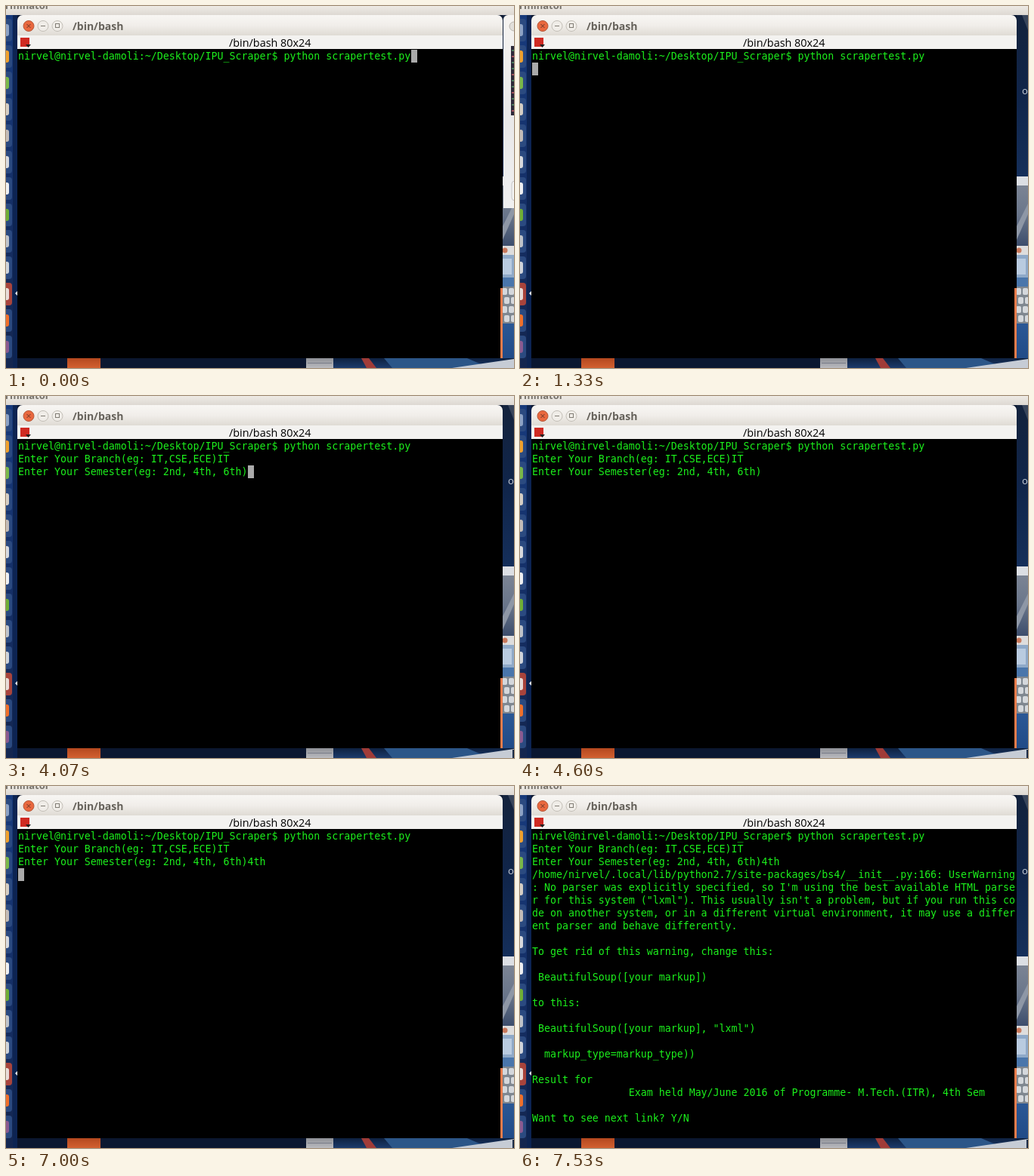
An HTML page with a canvas that plays this animation: 672x480 px, repeating every 8 s.

```html
<!DOCTYPE html>
<html lang="en">
<head>
<meta charset="utf-8">
<title>Terminal session</title>
<style>
  html, body { margin: 0; width: 100%; height: 100%; overflow: hidden; background: #000; }
  canvas { display: block; }
</style>
</head>
<body>
<canvas id="stage" width="672" height="480"></canvas>
<script>
const ctx = document.getElementById('stage').getContext('2d');
const LOOP = 8000, CELL_W = 8, CELL_H = 17, LEFT = 16, TOP = 58;
const UI_FONT = '"Open Sans", "Noto Sans", sans-serif';

// Text written to the terminal: [time in ms, characters]
const output = [
  [0, 'nirvel@nirvel-damoli:~/Desktop/IPU_Scraper$ python scrapertest.py'],
  [1330, '\n'],
  [1800, 'Enter Your Branch(eg: IT,CSE,ECE)'],
  [3200, 'I'], [3330, 'T'],
  [4070, '\nEnter Your Semester(eg: 2nd, 4th, 6th)'],
  [5600, '4'], [6270, 't'], [6400, 'h'],
  [7000, '\n'],
  [7200, '/home/nirvel/.local/lib/python2.7/site-packages/bs4/__init__.py:166: UserWarning' +
    ": No parser was explicitly specified, so I'm using the best available HTML parse" +
    'r for this system ("lxml"). This usually isn\'t a problem, but if you run this co' +
    'de on another system, or in a different virtual environment, it may use a differ' +
    'ent parser and behave differently.\n\n' +
    'To get rid of this warning, change this:\n\n BeautifulSoup([your markup])\n\n' +
    'to this:\n\n BeautifulSoup([your markup], "lxml")\n\n  markup_type=markup_type))\n'],
  [7330, '\nResult for\n' + ' '.repeat(16) +
    'Exam held May/June 2016 of Programme- M.Tech.(ITR), 4th Sem\n\nWant to see next link? Y/N'],
];
const cursorHidden = [[670, 1270], [1870, 2470], [3930, 4070], [4600, 5200], [7530, LOOP]];

function rect(color, x, y, w, h) {
  ctx.fillStyle = color;
  ctx.fillRect(x, y, w, h);
}

function shape(color, path, stroke) {
  ctx.beginPath();
  path();
  ctx.fillStyle = color;
  ctx.fill();
  if (stroke) {
    ctx.strokeStyle = stroke;
    ctx.stroke();
  }
}

const round = (color, x, y, w, h, r, stroke) =>
  shape(color, () => ctx.roundRect(x, y, w, h, r), stroke);
const circle = (color, x, y, r, stroke) =>
  shape(color, () => ctx.arc(x, y, r, 0, 7), stroke);
const polygon = (color, ...points) =>
  shape(color, () => points.forEach(([x, y]) => ctx.lineTo(x, y)));

function label(text, x, y, font, color) {
  ctx.font = font;
  ctx.fillStyle = color;
  ctx.fillText(text, x, y);
}

function gradient(y0, y1, ...colors) {
  const g = ctx.createLinearGradient(0, y0, 0, y1);
  colors.forEach((c, i) => g.addColorStop(i / (colors.length - 1), c));
  return g;
}

function drawWallpaper() {
  rect('#0b1730', 0, 0, 672, 480);
  // Strip to the right of the terminal
  rect(gradient(12, 226, '#14233d', '#10254a', '#152f5a'), 657, 12, 15, 214);
  polygon('#39465c', [664, 12], [672, 12], [672, 32]);
  label('o', 664, 117, '13px ' + UI_FONT, '#c9d0da');
  rect('#dcdfe4', 657, 226, 15, 12);
  rect(gradient(238, 318, '#7b8494', '#69758a', '#3c4d6c'), 657, 238, 15, 80);
  polygon('#8e97a6', [657, 292], [672, 262], [672, 276], [657, 310]);
  rect('#dedddd', 657, 318, 15, 12);
  circle('#c8785c', 660, 324, 3.5);
  rect('#8fa9c8', 657, 330, 15, 30);
  rect('#b9cbe0', 657, 335, 12, 21);
  rect('#4a76ab', 657, 360, 15, 12);
  rect('#7f8790', 657, 372, 15, 49);
  for (let row = 0; row < 4; row++)
    for (let col = 0; col < 2; col++)
      round('#d5d8dc', 656 + col * 9 + row % 2 * 3, 374 + row * 12, 7, 9, 2);
  rect(gradient(421, 480, '#2a5795', '#1f4884'), 657, 421, 15, 59);
  // Strip below the terminal
  rect(gradient(467, 480, '#b5491f', '#d26030'), 81, 467, 44, 13);
  rect(gradient(467, 480, '#8f9197', '#b9babf'), 397, 467, 36, 13);
  rect('#777b88', 399, 473, 32, 1);
  rect(gradient(467, 480, '#0e2140', '#1b3a6b'), 433, 467, 239, 13);
  polygon('#a03c38', [470, 467], [480, 467], [490, 480], [477, 480]);
  polygon('#2c5688', [500, 467], [610, 467], [640, 480], [511, 480]);
  polygon('#c6ccd5', [672, 468], [672, 480], [590, 480]);
}

function drawLauncher() {
  rect(gradient(12, 480, '#173a7c', '#153068', '#14264f'), 0, 12, 15, 468);
  rect('#0d2452', 9, 12, 6, 468);
  const icons = ['#8da2c4', '#f0a02c', '#79b848', '#d6cfc4', '#c3bcb8', '#d8dade', '#eef0f2',
    '#6fae35', '#c0c4ca', '#d0d4da', '#e8dcd8', '#f0702a', '#8a5a90'];
  icons.forEach((color, i) => {
    const y = 32 + 35 * i;
    round(i === 10 ? '#a8443c' : '#2b4a80', -20, y - 15, 28, 30, 4);
    round(color, -10, y - 8, 14, 16, 3);
  });
  polygon('#f2f4f6', [15, 378], [12, 381], [15, 384]);
}

// Neighbouring window that fades away at the start
function drawSideWindow(t) {
  const alpha = t < 130 ? 1 : t < 200 ? 0.5 : 0;
  if (!alpha) return;
  ctx.globalAlpha = alpha;
  round(gradient(12, 268, '#f6f4f1', '#e9e8e8', '#f0f0f1'), 658, 12, 30, 256, [6, 0, 0, 0]);
  circle('#e2dfda', 672, 27, 6, '#b9b5ae');
  rect('#2c2838', 668, 53, 4, 92);
  for (let y = 58; y < 142; y += 8) rect(y % 3 ? '#4a7a5c' : '#a0505c', 669, y, 3, 2);
  round('#f4f4f4', 669, 232, 20, 26, 4, '#c6c6c8');
  ctx.globalAlpha = 1;
}

function drawWindowFrame() {
  rect(gradient(0, 12, '#eeeae5', '#ddd8d2'), 0, 0, 672, 12);
  label('rminator', -1, 4, 'bold 13px ' + UI_FONT, '#77736c');
  round(gradient(12, 39, '#f8f6f3', '#f1eeea', '#dfdbd4'), 15, 12, 642, 34, [7, 7, 0, 0]);
  rect('#f3f2f0', 15, 39, 642, 18);

  ctx.lineWidth = 1;
  circle('#e9683f', 30, 26.5, 7, '#b4583a');
  circle('#f0ede8', 49, 26.5, 7, '#c2beb6');
  circle('#f0ede8', 68, 26.5, 7, '#c2beb6');
  ctx.strokeStyle = '#6a3526';
  ctx.beginPath();
  for (const d of [-1, 1]) {
    ctx.moveTo(27.5, 26.5 - 2.5 * d);
    ctx.lineTo(32.5, 26.5 + 2.5 * d);
  }
  ctx.stroke();
  rect('#807c74', 46, 26, 6, 1);
  ctx.strokeStyle = '#807c74';
  ctx.strokeRect(65.5, 23.5, 5, 5);
  label('/bin/bash', 88, 32, 'bold 14px ' + UI_FONT, '#66625b');

  rect('#d02a22', 19, 42, 12, 12);
  polygon('#222', [26, 51], [33, 51], [29.5, 55]);
  label('/bin/bash 80x24', 295, 54, '14.4px ' + UI_FONT, '#000');
}

function drawTerminal(t) {
  rect('#000', 15, 57, 642, 410);
  rect('#e87c4c', 654, 374, 3, 93);

  const text = output.filter(([start]) => t >= start).map(([, chars]) => chars).join('');
  const lines = text.split('\n').flatMap(line => line.match(/.{1,80}/g) || ['']);
  lines.forEach((line, row) =>
    label(line, LEFT, TOP + 13 + row * CELL_H,
      '13.288px "DejaVu Sans Mono", monospace', '#1cf01c'));

  if (!cursorHidden.some(([from, to]) => t >= from && t < to)) {
    const row = lines.length - 1;
    rect('#aaa', LEFT + lines[row].length * CELL_W, TOP + row * CELL_H, CELL_W, CELL_H);
  }
}

function draw(now) {
  const t = now % LOOP;
  drawWallpaper();
  drawLauncher();
  drawSideWindow(t);
  drawWindowFrame();
  drawTerminal(t);
  if (t >= 1800) rect('#1c2c48', 670, 469, 2, 11);
  requestAnimationFrame(draw);
}
requestAnimationFrame(draw);
</script>
</body>
</html>
```
